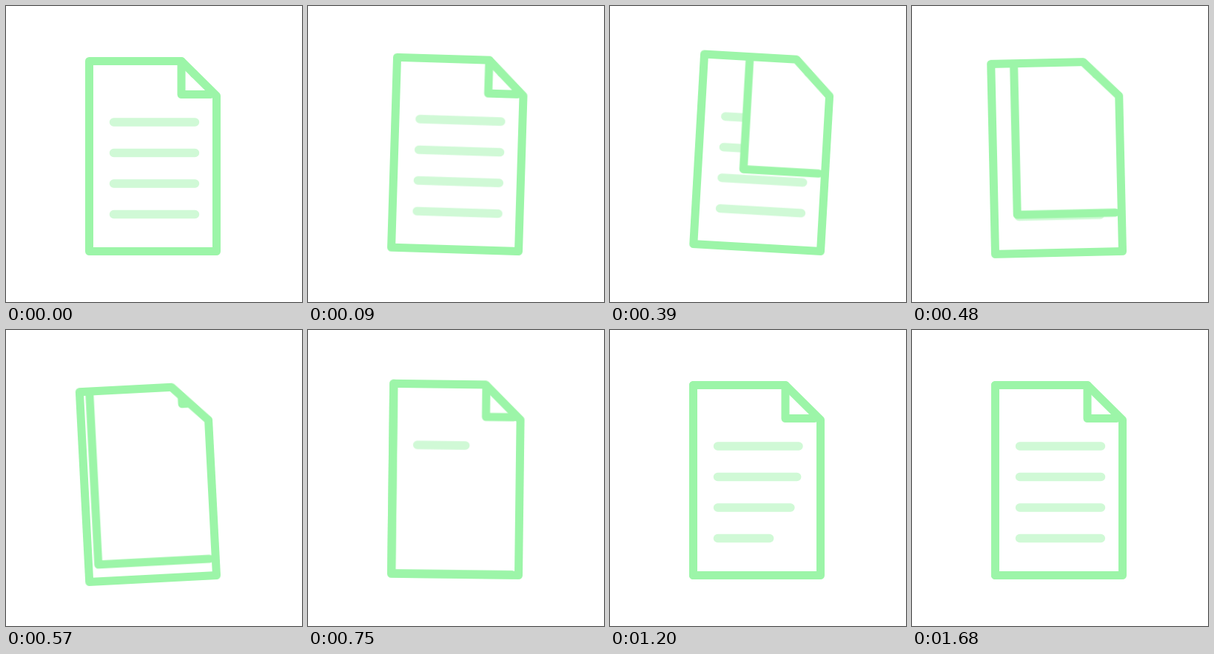
Animation, 400 px wide and 400 px high, one loop 2400 ms. Source, as an HTML page without scripts:

```html
<!DOCTYPE html>
<html lang="en">
<head>
<meta charset="utf-8">
<title>Page turn</title>
<style>
  html, body { margin: 0; width: 100%; height: 100%; overflow: hidden; background: #fff; }
  svg { display: block; width: 100vw; height: 100vh; }

  .edge { fill: none; stroke: #9cf5a8; stroke-width: 11; stroke-linecap: round; stroke-linejoin: round; }
  .text { fill: none; stroke: #d0f9d6; stroke-width: 11.4; stroke-linecap: round; }

  .doc { transform-origin: 284.5px 331.5px; animation: sway 2400ms cubic-bezier(.37, 0, .63, 1) infinite; }
  .sheet { fill: #fff; animation: sheet 2400ms linear infinite; }
  .flap { animation: flap 2400ms linear infinite; }
  .fold { animation: fold 2400ms linear infinite; }
  .fresh { animation: gate 2400ms step-end infinite; }
  .fresh path { opacity: 0; stroke-dasharray: 110 300; animation: grow 2400ms linear var(--at) infinite; }

  @keyframes sway {
    0%, 47.083%, 100% { transform: rotate(0deg); }
    11.25% { transform: rotate(7deg); }
    23.333% { transform: rotate(-3deg); }
    35.417% { transform: rotate(2deg); }
  }

  /* The corner peels to the bottom left and leaves a blank page. */
  @keyframes sheet {
    0%, 9.25% { d: path("M237 74.5V119.5H284.5V121.5L237 74.5Z"); animation-timing-function: ease; }
    33.04%, 100% { d: path("M112.5 74.5V331.5H284.5V121.5L237 74.5Z"); }
  }
  @keyframes flap {
    0%, 9.25% { d: path("M237 74.5V119.5H276"); animation-timing-function: ease; }
    33.04%, 100% { d: path("M112.5 74.5V331.5H276"); }
  }
  @keyframes fold {
    0%, 21.458% { d: path("M254 91.5V91.5H254"); animation-timing-function: ease; }
    35.2%, 100% { d: path("M237 74.5V119.5H276"); }
  }

  /* New lines show only after the old ones are covered. */
  @keyframes gate {
    0% { visibility: hidden; }
    25%, 100% { visibility: visible; }
  }
  @keyframes grow {
    0% { opacity: 1; stroke-dashoffset: 110; animation-timing-function: cubic-bezier(.22, 1, .36, 1); }
    32.917%, 80.99% { opacity: 1; stroke-dashoffset: 0; }
    81%, 100% { opacity: 0; stroke-dashoffset: 0; }
  }
</style>
</head>
<body>
<svg viewBox="0 0 400 400">
  <g class="doc">
    <path class="text" d="M145.5 157h110M145.5 198.5h110M145.5 240h110M145.5 281.5h110"/>
    <path class="sheet" d="M237 74.5V119.5H284.5V121.5L237 74.5Z"/>
    <path class="edge flap" d="M237 74.5V119.5H276"/>
    <g class="text fresh">
      <path style="--at: 621ms" d="M145.5 157h110"/>
      <path style="--at: 766ms" d="M145.5 198.5h110"/>
      <path style="--at: 911ms" d="M145.5 240h110"/>
      <path style="--at: 1056ms" d="M145.5 281.5h110"/>
    </g>
    <path class="edge fold" d="M254 91.5V91.5H254"/>
    <path class="edge" d="M112.5 74.5H237L284.5 121.5V331.5H112.5Z"/>
  </g>
</svg>
</body>
</html>
```
